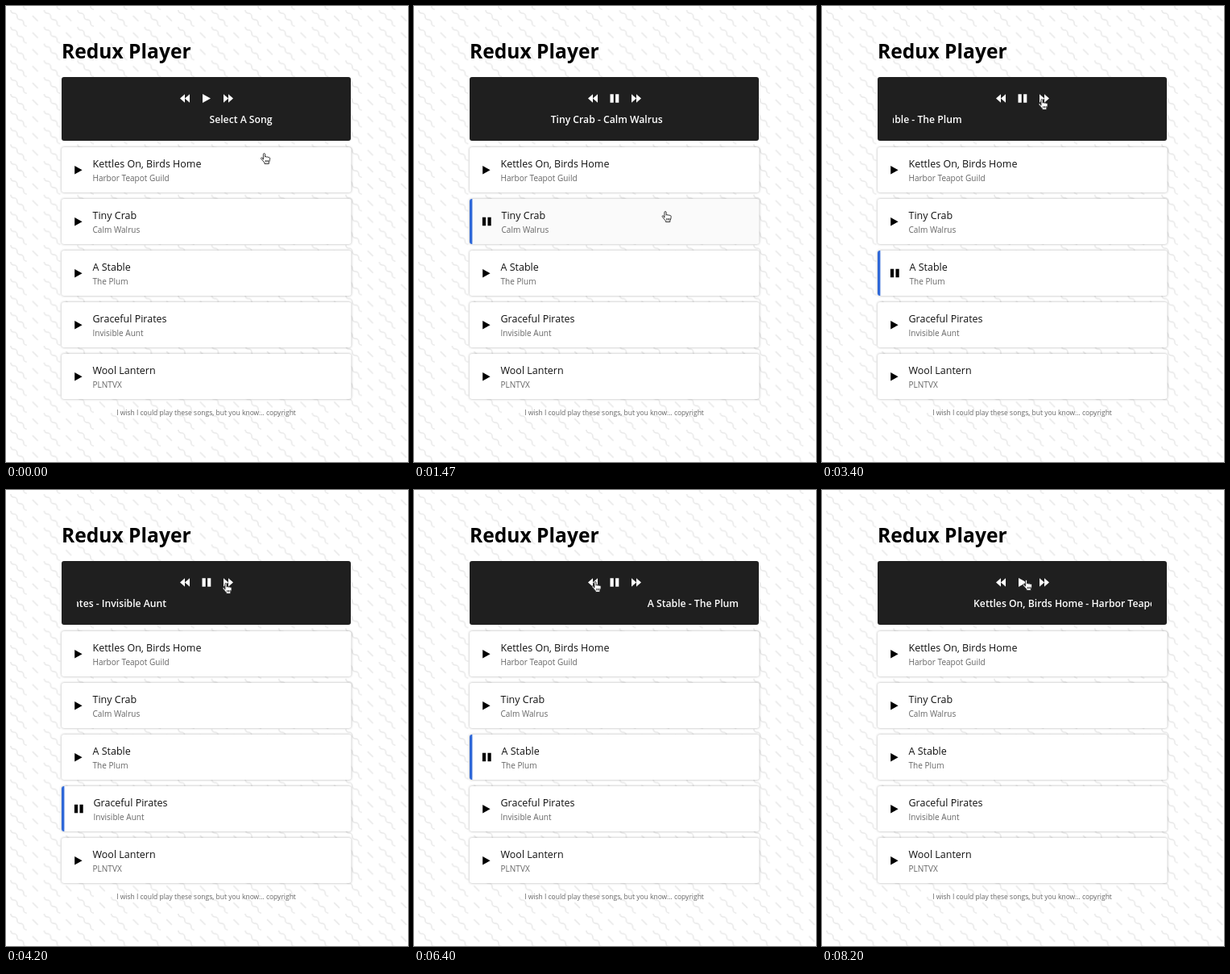
Write an HTML page that moves like this. It is 499 px wide and 565 px high and loops after 8.27 s.

```html
<!DOCTYPE html>
<html lang="en">
<head>
<meta charset="utf-8">
<title>Redux Player</title>
<style>
  html, body { margin: 0; width: 100%; height: 100%; overflow: hidden; background: #fff; }
  svg { display: block; width: 499px; height: 565px; font-family: "Open Sans", "Noto Sans", sans-serif; }
  .heading { font-size: 24.6px; font-weight: 700; }
  .song { font-size: 12.5px; fill: #111; }
  .artist { font-size: 10.05px; fill: #666; }
  .note { font-size: 8.5px; fill: #666; text-anchor: middle; }
  .ticker { font-size: 12.2px; font-weight: 600; fill: #fff; }
  .card { filter: drop-shadow(0 0 1.6px rgba(0, 0, 0, .32)); }
</style>
</head>
<body>
<svg id="stage" viewBox="0 0 499 565"></svg>
<script>
const LOOP = 8270;
const STEP = 200 / 3;
const SCROLL_SPEED = 0.0565;
const SCROLL_RESTART = 4290;

const songs = [
  ["Kettles On, Birds Home", "Harbor Teapot Guild"],
  ["Tiny Crab", "Calm Walrus"],
  ["A Stable", "The Plum"],
  ["Graceful Pirates", "Invisible Aunt"],
  ["Wool Lantern", "PLNTVX"]
];

// [time, song index, playing]
const clicks = [
  [0, -1, false], [1270, 1, true], [2330, 2, true], [3800, 3, true],
  [4270, 4, true], [4730, 0, true], [5130, 1, true], [5530, 2, true],
  [6600, 1, true], [7270, 0, true], [7950, 0, false]
];

// [time, x, y] of the middle of the hand
const cursorPath = [
  [0, 322, 189], [400, 325, 208], [900, 316, 236], [1130, 313.5, 261],
  [1800, 313.5, 261], [2200, 320, 328], [2700, 319.5, 328], [3400, 274.5, 122],
  [5850, 274.5, 122], [6400, 226.5, 120], [7400, 226.5, 120], [7750, 255, 118],
  [LOOP, 255, 118]
];

const rowTop = i => 175 + 64 * i;
const triangle = (x, y, w, h) => `M${x} ${y - h / 2}l${w} ${h / 2}l${-w} ${h / 2}z`;
const bars = (x, y, w, gap, h) =>
  [x, x + w + gap].map(left => `M${left} ${y - h / 2}h${w}v${h}h${-w}z`).join("");

const rowMarkup = ([title, artist], i) => {
  const y = rowTop(i);
  return `<g>
    <rect class="card" x="69" y="${y}" width="359.5" height="56" rx="3" fill="#fff"/>
    <path class="accent" d="M72.4 ${y}h-.4a3 3 0 0 0-3 3v50a3 3 0 0 0 3 3h.4z" fill="#2f68d8"/>
    <path class="icon"/>
    <g class="label">
      <text class="song" x="107.5" y="${y + 24.5}">${title}</text>
      <text class="artist" x="107.5" y="${y + 42}">${artist}</text>
    </g>
  </g>`;
};

const stage = document.getElementById("stage");
stage.innerHTML = `
  <defs>
    <pattern id="wiggle" width="52" height="26" patternUnits="userSpaceOnUse"
             patternTransform="translate(5 5) scale(.8)">
      <path fill="none" stroke="#e9e9e9" stroke-width="2"
            d="M1 0c0 2.8 2.2 5 5 5s5 2.2 5 5 2.2 5 5 5 5 2.2 5 5 2.2 5 5 5M34.8 8.8l8.4 8.4"/>
    </pattern>
    <clipPath id="window"><rect x="88" y="126" width="321" height="30"/></clipPath>
  </defs>
  <rect width="499" height="565" fill="#fff"/>
  <rect width="499" height="565" fill="url(#wiggle)"/>
  <text class="heading" x="69" y="65">Redux Player</text>
  <rect x="69" y="88" width="359" height="79" rx="3" fill="#1f1f1f"/>
  <g fill="#fff">
    <path d="${triangle(228, 114.5, -6, 10.5)}${triangle(222, 114.5, -6, 10.5)}"/>
    <path id="toggle"/>
    <path d="${triangle(270, 114.5, 6, 10.5)}${triangle(276, 114.5, 6, 10.5)}"/>
  </g>
  <g clip-path="url(#window)"><text id="ticker" class="ticker" y="145"></text></g>
  <g id="rows">${songs.map(rowMarkup).join("")}</g>
  <text class="note" x="248.5" y="507">I wish I could play these songs, but you know... copyright</text>
  <path id="hand" fill="#fff" stroke="#222" stroke-width=".9" stroke-linejoin="round"
    d="M-2.6 1.2V-5.2c0-1.7 2.2-1.7 2.2 0v3.4c.2-1 2-.9 2.1.2.3-.9 1.9-.7 2 .4.4-.7 1.9-.4 1.9.9
       0 3-.4 3.6-1.3 5v1.8h-5.4V5.2C-2.4 3.8-3.6 2-5.2.4c-.9-1.1.5-2.1 1.5-1.2zM.2 2v2.6M2 2v2.6M3.8 2v2.6"/>`;

const find = id => document.getElementById(id);
const [toggle, ticker, hand] = ["toggle", "ticker", "hand"].map(find);
const rows = [...find("rows").children].map(row => ({
  card: row.querySelector(".card"),
  accent: row.querySelector(".accent"),
  icon: row.querySelector(".icon"),
  label: row.querySelector(".label")
}));

function cursorAt(t) {
  const next = Math.max(1, cursorPath.findIndex(([time]) => time >= t));
  const [t0, x0, y0] = cursorPath[next - 1];
  const [t1, x1, y1] = cursorPath[next];
  const p = (t - t0) / (t1 - t0);
  const eased = p * p * (3 - 2 * p);
  return [x0 + (x1 - x0) * eased, y0 + (y1 - y0) * eased];
}

function tickerX(t) {
  return t < SCROLL_RESTART
    ? 252.5 - SCROLL_SPEED * t
    : 409 - SCROLL_SPEED * (t - SCROLL_RESTART);
}

function render(t) {
  const [, current, playing] = clicks.filter(([time]) => time <= t + 4).pop();
  const [x, y] = cursorAt(t);

  hand.setAttribute("transform", `translate(${x} ${y})`);
  toggle.setAttribute("d", playing ? bars(243.5, 114.5, 4.2, 2.4, 10.4) : triangle(244, 114.5, 10, 11.2));
  ticker.textContent = current < 0 ? "Select A Song" : songs[current].join(" - ");
  ticker.setAttribute("x", tickerX(t));

  rows.forEach(({ card, accent, icon, label }, i) => {
    const top = rowTop(i);
    const active = playing && i === current;
    const hovered = y - 6 >= top && y - 6 <= top + 56;
    card.setAttribute("fill", active && hovered ? "#fafafa" : "#fff");
    accent.setAttribute("visibility", active ? "visible" : "hidden");
    icon.setAttribute("d", active ? bars(84.9, top + 28, 4.2, 2.4, 10.4) : triangle(85.2, top + 28.2, 9.4, 10.6));
    label.setAttribute("transform", `translate(${active ? 1 : 0} 0)`);
  });
}

// The picture advances at 15 steps per second.
const start = performance.now();
function tick() {
  const t = (performance.now() - start) % LOOP;
  render(Math.min(123, Math.floor((t + 3.4) / STEP)) * STEP);
  requestAnimationFrame(tick);
}
render(0);
tick();
</script>
</body>
</html>
```
